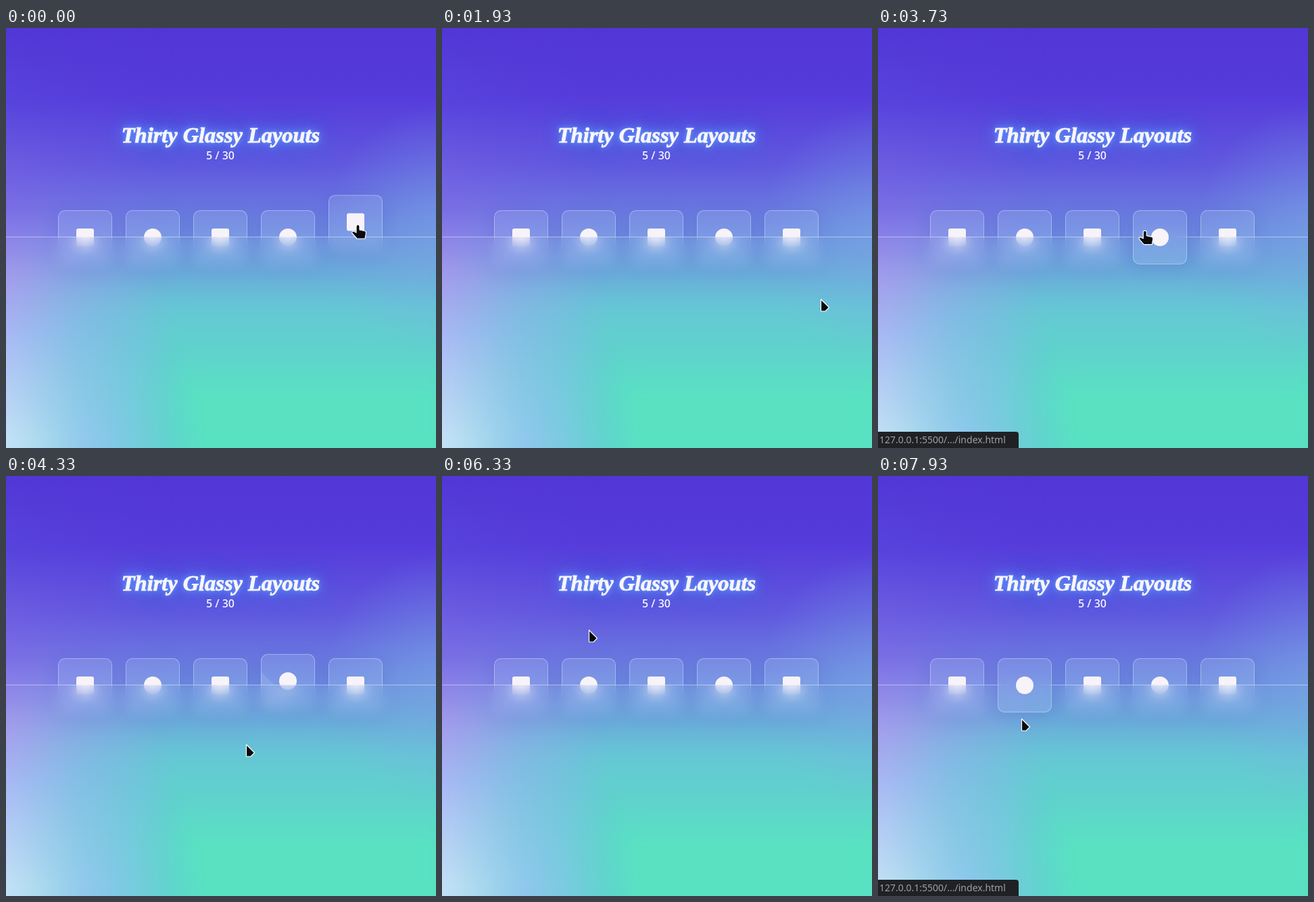
These frames come from a looping animation (636x620 px, 8 s). An HTML page:

```html
<!DOCTYPE html>
<html lang="en">
<head>
<meta charset="utf-8">
<title>Glass icons</title>
<style>
  html, body { margin: 0; width: 100%; height: 100%; overflow: hidden; }
  #stage {
    position: relative; width: 636px; height: 620px; overflow: hidden;
    background:
      radial-gradient(170px 260px at 120px 620px, #6ab4e8, transparent),
      radial-gradient(190px 190px at 660px 300px, rgba(122, 172, 228, .55), transparent),
      linear-gradient(#5237d6, #563bdb 16%, #6159df 33%, #6d8ae0 49%, #62c5d5 66%, #56e1c1 88%);
  }
  #stage > * { position: absolute; box-sizing: border-box; }
  #haze {
    inset: 0;
    background: linear-gradient(#5237d6, #5844dc 18%, #7a6ee4 43%, #a39cec 60%, #a9b6f5 73%, #c4e0f6 97%);
    -webkit-mask: linear-gradient(90deg, #000, rgba(0, 0, 0, .45) 105px, transparent 250px);
  }
  h1 {
    left: 0; width: 635px; top: 138px; margin: 0; text-align: center; color: #f8f5fb;
    font: italic bold 32.4px/40px "Liberation Serif", serif;
    -webkit-text-stroke: .9px #f8f5fb;
    text-shadow: 0 0 7px #6ba2ff, 0 0 16px #5f96fa, 0 0 24px #5a90fa, 0 0 40px #5585f5;
  }
  #count {
    left: 0; width: 634px; top: 177px; text-align: center; color: #f4f2fc;
    font: 600 16px/22px "Open Sans", sans-serif;
  }
  .card {
    top: 269px; width: 80px; height: 80px; border-radius: 10px;
    border: 1px solid rgba(255, 255, 255, .34); background-origin: border-box;
    box-shadow: 0 6px 24px rgba(50, 50, 170, .14);
  }
  .card i { position: absolute; inset: 26px; border-radius: 3px; background: #f7f3f9; }
  .card i.round { border-radius: 50%; }
  #glass {
    left: 0; top: 308px; width: 636px; height: 312px; z-index: 2;
    border-top: 1px solid rgba(255, 255, 255, .42); background: rgba(255, 255, 255, .02);
    backdrop-filter: blur(10px);
  }
  #status {
    left: 0; top: 596px; width: 208px; height: 24px; padding-left: 2px; z-index: 4;
    border-top-right-radius: 4px; background: #202124; color: #9aa0a6; white-space: nowrap;
    font: 14px/24px "Noto Sans", sans-serif;
  }
  #cursor { left: 0; top: 0; z-index: 5; overflow: visible; }
  #cursor path { fill: #0b0b0d; stroke: #fff; stroke-width: 1.2; stroke-linejoin: round; }
</style>
</head>
<body>
<div id="stage">
  <div id="haze"></div>
  <h1>Thirty Glassy Layouts</h1>
  <div id="count">5 / 30</div>
  <div id="glass"></div>
  <div id="status">127.0.0.1:5500/.../index.html</div>
  <svg id="cursor" width="20" height="20">
    <path id="hand" d="M-2 2a2 2 0 0 1 5 0v5l7 1.500q3 .5 2.500 3.500l-1.500 8H-1L-8 12q-1-3 2-3l4 2z"/>
    <path id="arrow" d="M.5 .5v17.500h6.500l5.500-5.500z"/>
  </svg>
</div>
<script>
const LOOP = 8000, PHASE = 250, RISE = 75, STATUS_DELAY = 620;
const $ = id => document.getElementById(id);
const easeInOut = u => u < .5 ? 2 * u * u : 1 - 2 * (1 - u) ** 2;

const hovers = [
  { card: 4, from: -96, to: 1200 },
  { card: 3, from: 2423, to: 4280 },
  { card: 2, from: 4650, to: 5820 },
  { card: 1, from: 6650, to: LOOP }
];
// the pointer rests at x, y between the two times and glides from stop to stop
const stops = [
  { from: 0, to: 0, x: 520, y: 291 },
  { from: 450, to: 1070, x: 509, y: 293 },
  { from: 1870, to: 1930, x: 560, y: 400 },
  { from: 2730, to: 3600, x: 397, y: 293 },
  { from: 4330, to: 4400, x: 355, y: 396 },
  { from: 4900, to: 5800, x: 318, y: 301 },
  { from: 6330, to: 6330, x: 217, y: 227 },
  { from: 6800, to: 7600, x: 219, y: 301 },
  { from: 7930, to: LOOP, x: 212, y: 358 }
];

const cards = Array.from({ length: 5 }, (_, i) => {
  const card = document.createElement('div');
  card.className = 'card';
  card.style.left = 77 + 100 * i + 'px';
  card.innerHTML = `<i class="${i % 2 ? 'round' : ''}"></i>`;
  $('stage').insertBefore(card, $('glass'));
  return card;
});

// edge: right side of the diagonal sheen, measured as x - y inside the card
function setCard(card, lift, front, edge) {
  const base = 'rgba(205,232,255,.15)', lit = 'rgba(225,240,255,.24)';
  const from = (edge + 30) / Math.SQRT2 + 'px', to = (edge + 80) / Math.SQRT2 + 'px';
  card.style.transform = `translateY(${-lift}px)`;
  card.style.zIndex = front ? 3 : 1;
  card.style.backdropFilter = front ? 'blur(10px)' : 'none';
  card.style.backgroundImage =
    `linear-gradient(45deg, ${base} ${from}, ${lit} ${from}, ${lit} ${to}, ${base} ${to})`;
}

// a card rises and falls once on entering, ending in front, and once on leaving, behind the glass
function drawCards(t) {
  cards.forEach((card, i) => {
    const hover = hovers.find(h => h.card === i);
    if (!hover || t < hover.from) return setCard(card, 0, false, -80);
    const inside = t < hover.to;
    const u = Math.min(2, (t - (inside ? hover.from : hover.to)) / PHASE);
    const edge = inside ? 200 - 140 * u : 200 - 280 * (1 - u / 2) ** 2;
    setCard(card, RISE * easeInOut(u < 1 ? u : 2 - u), inside && u >= 1, edge);
  });
}

function drawCursor(t) {
  const k = stops.findLastIndex(s => s.from <= t);
  const a = stops[k], b = stops[k + 1] || a;
  const u = t > a.to ? easeInOut((t - a.to) / (b.from - a.to)) : 0;
  const x = a.x + (b.x - a.x) * u, y = a.y + (b.y - a.y) * u;
  const overCard = y > 269 && y < 349 && x > 77 && x < 557 && (x - 77) % 100 < 80;
  $('cursor').style.transform = `translate(${x}px, ${y}px)`;
  $('hand').style.display = overCard ? '' : 'none';
  $('arrow').style.display = overCard ? 'none' : '';
}

function draw() {
  const t = performance.now() % LOOP;
  drawCards(t);
  drawCursor(t);
  const linkShown = hovers.some(h => t >= h.from + STATUS_DELAY && t < h.to);
  $('status').style.display = linkShown ? '' : 'none';
  requestAnimationFrame(draw);
}
draw();
</script>
</body>
</html>
```
